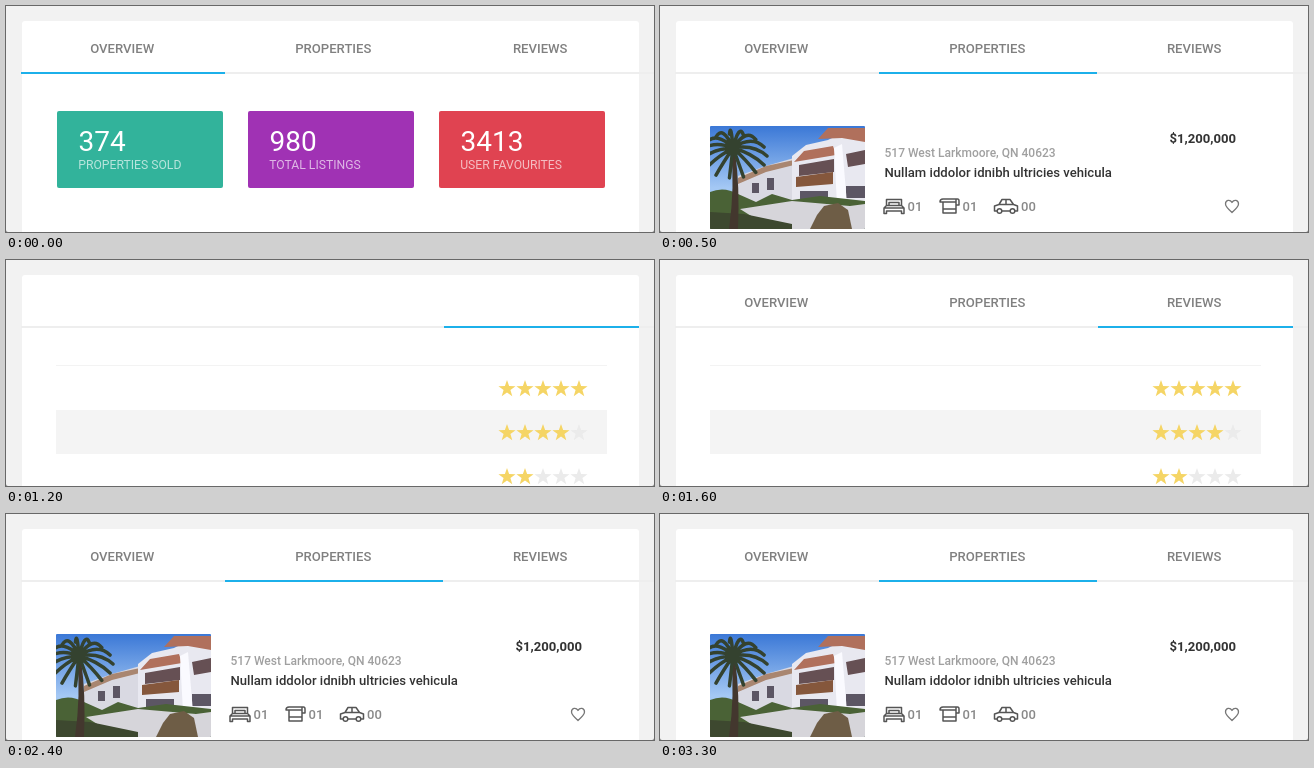
Write an HTML page that moves like this. It is 648x226 px and loops after 3.4 s.

```html
<!DOCTYPE html>
<html lang="en">
<head>
<meta charset="utf-8">
<title>Listing tabs</title>
<style>
  html, body { margin: 0; width: 100%; height: 100%; overflow: hidden; background: #777; }
  svg { display: block; width: 648px; height: 226px; background: #f2f2f2; border-radius: 0 0 2px 2px; font-family: Roboto, sans-serif; }
  #labels { font-size: 13.1px; font-weight: 500; fill: #808080; text-anchor: middle; }
  .num { font-size: 28px; fill: #fff; }
  .cap { font-size: 12.2px; fill: #fff; fill-opacity: .65; }
  .icon { fill: none; stroke: #555; stroke-width: 1.5; stroke-linejoin: round; }
  .count { font-size: 13px; font-weight: 500; fill: #888; }
</style>
</head>
<body>
<svg viewBox="0 0 648 226">
  <defs>
    <linearGradient id="sky" x2="0" y2="1">
      <stop stop-color="#3b78d6"/><stop offset=".6" stop-color="#a4c8f4"/>
    </linearGradient>
    <clipPath id="photo"><rect x="50" y="120" width="155" height="103" rx="1"/></clipPath>
  </defs>
  <rect x="16" y="15" width="617" height="220" rx="3" fill="#fff"/>
  <rect x="15" y="66" width="633" height="2" fill="#eee"/>
  <rect id="bar" y="66" height="2" fill="#1cb0ea"/>
  <g id="labels">
    <text x="116.2" y="47">OVERVIEW</text>
    <text x="327.3" y="47">PROPERTIES</text>
    <text x="534.2" y="47">REVIEWS</text>
  </g>

  <g id="overview"></g>

  <g id="properties">
    <rect id="hover" x="50" y="105" width="551" height="121" fill="#fefdf0"/>
    <path id="rule" d="M50 105.5H601" stroke="#f5f5f5"/>
    <g clip-path="url(#photo)">
      <rect x="50" y="120" width="155" height="103" fill="url(#sky)"/>
      <path d="M78 170L106 160L134 152V212H78Z" fill="#d9d9e2"/>
      <path d="M78 172L106 160L134 154V159L106 166L78 178Z" fill="#a98670"/>
      <path d="M132 150L146 139L168 134L184 126L205 130V212H132Z" fill="#e8e8f0"/>
      <path d="M134 156L144 145L173 140L176 149ZM158 133L168 122L205 122V136L182 132Z" fill="#b0705c"/>
      <path d="M139 159L174 153V166L139 170ZM186 148L205 144V158L188 161Z" fill="#665054"/>
      <path d="M136 171L173 166V178L136 181Z" fill="#85573c"/>
      <path d="M140 185H168V194H140ZM186 180H205V192H186ZM92 177H99V187H92ZM107 172H114V184H107Z" fill="#5c5664"/>
      <path d="M174 142L182 138L187 198H177Z" fill="#fafaff"/>
      <path d="M50 186Q64 180 78 188L96 196L112 188L132 194L160 190L205 195V223H50Z" fill="#4a6236"/>
      <path d="M80 203L132 195L190 200L205 198V223H112Z" fill="#d6d5da"/>
      <path d="M50 206L84 208L132 218V223H50Z" fill="#3d482f"/>
      <path d="M150 223L157 209L164 200L178 197L188 204L192 223Z" fill="#6e5d46"/>
      <path d="M71 146Q75 180 69 223H78Q80 180 75 146Z" fill="#43372e"/>
      <path id="palm" fill="none" stroke="#34422f" stroke-width="3.5" stroke-linecap="round"/>
    </g>
    <text x="224.5" y="151" font-size="12" font-weight="500" fill="#a0a0a0">517 West Larkmoore, QN 40623</text>
    <text x="224.5" y="171" font-size="13.1" font-weight="500" fill="#333">Nullam iddolor idnibh ultricies vehicula</text>
    <text x="576" y="137" font-size="13.1" font-weight="700" fill="#333" text-anchor="end">$1,200,000</text>
    <g class="icon">
      <path d="M226.5 200V193.5H241.5V200M224 207.5V202L226.5 199.5H241.5L244 202V207.5H241.5V205H226.5V207.5ZM229 199V196.5H239V199M224 202H244"/>
      <path d="M283 193H297.5Q299 193 299 195V199H296M283 193Q280 193 280 196H296V207H283V196M283 203H296M296 193V196"/>
      <path d="M337 205H334.5V200L339 198.5L342 193.5H350L353.5 198.5L357.5 200V205H355M342 205H350M339 198.5H353.5M346 193.5V198.5"/>
      <circle cx="339.5" cy="205" r="2.3"/><circle cx="352.5" cy="205" r="2.3"/>
      <path d="M572 206.5C567 202 565.5 200.5 565.5 198C565.5 194 570 193 572 196.5C574 193 578.5 194 578.5 198C578.5 200.5 577 202 572 206.5Z" stroke="#777" stroke-width="1.3"/>
    </g>
    <g class="count">
      <text x="247.5" y="205">01</text>
      <text x="302.5" y="205">01</text>
      <text x="361" y="205">00</text>
    </g>
  </g>

  <g id="reviews">
    <path d="M50 105.5H601" stroke="#f3f3f3"/>
    <rect x="50" y="150" width="551" height="44" fill="#f4f4f4"/>
  </g>
</svg>
<script>
const $ = id => document.getElementById(id);
const LOOP = 3400;

const cards = [
  [51, '#32b39b', '374', 'PROPERTIES SOLD'],
  [242, '#a032b4', '980', 'TOTAL LISTINGS'],
  [433, '#e04351', '3413', 'USER FAVOURITES']
];
$('overview').innerHTML = cards.map(([x, color, num, cap]) => `
  <rect x="${x}" y="105" width="166" height="77" rx="2" fill="${color}"/>
  <text class="num" x="${x + 21.5}" y="145">${num}</text>
  <text class="cap" x="${x + 21.2}" y="163">${cap}</text>`).join('');

// Fronds fan out from the crown and droop at their tips.
$('palm').setAttribute('d', Array.from({ length: 15 }, (_, i) => {
  const a = i / 15 * 2 * Math.PI, dx = 34 * Math.cos(a), dy = 22 * Math.sin(a);
  return `M73 142q${dx * .6} ${dy - 4} ${dx} ${dy + 8}`;
}).join(''));

function star(cx, cy, color) {
  const points = Array.from({ length: 10 }, (_, i) => {
    const r = i % 2 ? 3.6 : 9, a = (i / 5 - .5) * Math.PI;
    return `${(cx + r * Math.cos(a)).toFixed(2)},${(cy + r * Math.sin(a)).toFixed(2)}`;
  });
  return `<polygon points="${points.join(' ')}" fill="${color}"/>`;
}
$('reviews').innerHTML += [5, 4, 2].map((score, row) =>
  [0, 1, 2, 3, 4].map(i =>
    star(501 + 18 * i, 129 + 44 * row, i < score ? '#f5d565' : '#ebebeb')).join('')
).join('');

const tabs = [
  { id: 'overview', x: 15, width: 204 },
  { id: 'properties', x: 219, width: 218 },
  { id: 'reviews', x: 438, width: 195 }
];
const show = (id, on) => $(id).style.display = on ? '' : 'none';

function draw(t) {
  const between = (from, to) => t >= from && t < to;
  const active = t < 500 ? 0 : between(1200, 2000) ? 2 : 1;
  tabs.forEach((tab, i) => show(tab.id, i === active));
  $('bar').setAttribute('x', tabs[active].x);
  $('bar').setAttribute('width', tabs[active].width);
  show('labels', !between(1200, 1300));
  show('rule', between(2000, 2200));
  show('hover', between(2700, 3100));
  requestAnimationFrame(() => draw((performance.now() - start) % LOOP));
}
const start = performance.now();
draw(0);
</script>
</body>
</html>
```
